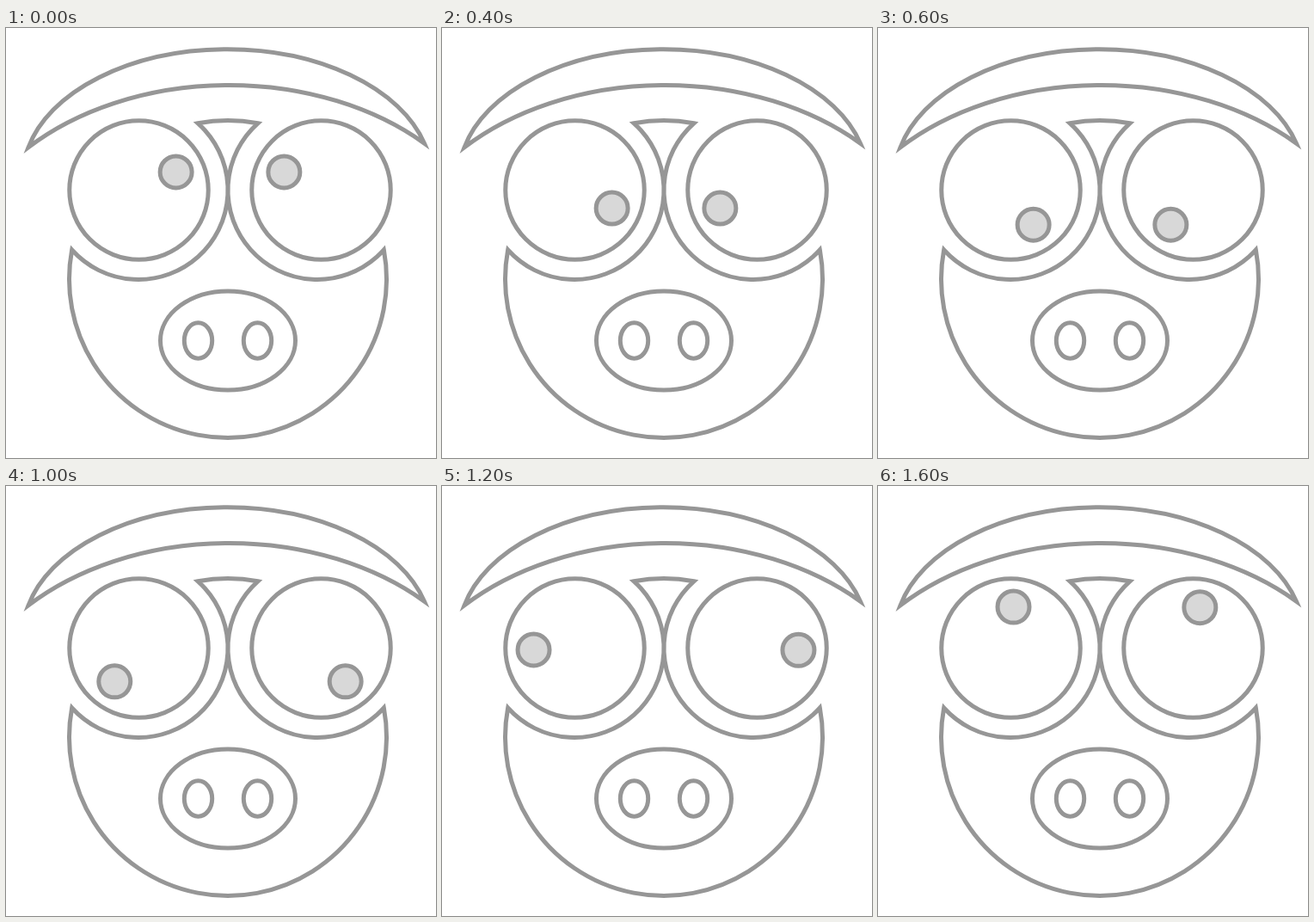
These frames come from a looping animation (500 px wide and 500 px high, 1800 ms). An HTML page with a canvas:

```html
<!DOCTYPE html>
<html lang="en">
<head>
<meta charset="utf-8">
<title>Rolling eyes</title>
<style>
  html, body { margin: 0; width: 100%; height: 100%; overflow: hidden; background: #fff; }
  canvas { display: block; }
</style>
</head>
<body>
<canvas id="stage" width="500" height="500"></canvas>
<script>
const ctx = document.getElementById('stage').getContext('2d');
const TAU = Math.PI * 2;
const LINE = '#969696';
const PUPIL = '#d8d8d8';
const STEP_MS = 200;

const face = { x: 258, y: 292, r: 184.5 };
const goggle = { x: 154, y: 188.5, r: 104 };
const eyes = [{ x: 154.5, side: 1 }, { x: 366.5, side: -1 }];
const eyeY = 188.5;
const orbit = 48;
const innerLimit = 44;

// Direction of gaze in degrees at each step; the eyes mirror each other
const gaze = [-26, -2, 26, 57, 85, 126, 177.6, 234.5, 273.6];

const hat = new Path2D(
  'M26 138.8 A237.5 148 0 0 1 486.5 134.2 A320 229 0 0 0 26 138.8 Z');

function ellipse(x, y, rx, ry = rx, fill = '#fff') {
  ctx.beginPath();
  ctx.ellipse(x, y, rx, ry, 0, 0, TAU);
  ctx.fillStyle = fill;
  ctx.fill();
  ctx.stroke();
}

// Face disc with a goggle circle cut out on either side
function drawFace() {
  const dx = face.x - goggle.x, dy = face.y - goggle.y;
  const d = Math.hypot(dx, dy);
  const axis = Math.atan2(dy, dx);
  const spread = Math.acos((goggle.r ** 2 - face.r ** 2 + d * d) / (2 * d * goggle.r));
  const low = axis + spread, high = axis - spread;
  const faceAngle = a => Math.atan2(
    goggle.y + goggle.r * Math.sin(a) - face.y,
    goggle.x + goggle.r * Math.cos(a) - face.x);
  const top = faceAngle(high), side = faceAngle(low);

  ctx.beginPath();
  ctx.arc(goggle.x, goggle.y, goggle.r, low, high, true);
  ctx.arc(face.x, face.y, face.r, top, -Math.PI - top);
  ctx.arc(2 * face.x - goggle.x, goggle.y, goggle.r, Math.PI - high, Math.PI - low, true);
  ctx.arc(face.x, face.y, face.r, Math.PI - side, side);
  ctx.closePath();
  ctx.stroke();
}

function drawEye({ x, side }, step) {
  // The right eye falls behind towards the end of the roll
  const lag = side < 0 ? 13 * (step / 8) ** 12 : 0;
  const angle = (gaze[step] - lag) * TAU / 360;
  const dx = Math.min(innerLimit, orbit * Math.cos(angle));
  ellipse(x, eyeY, 80.75);
  ellipse(x + side * dx, eyeY + orbit * Math.sin(angle), 18.5, 18.5, PUPIL);
}

function draw(time) {
  const step = Math.floor(time / STEP_MS) % gaze.length;
  ctx.fillStyle = '#fff';
  ctx.fillRect(0, 0, 500, 500);
  ctx.strokeStyle = LINE;
  ctx.lineWidth = 5;

  ctx.stroke(hat);
  drawFace();
  for (const eye of eyes) drawEye(eye, step);
  ellipse(258, 363.5, 78.5, 57.5);
  for (const x of [223.5, 292.5]) ellipse(x, 363.5, 16.2, 20.7);
}

const start = performance.now();
function tick() {
  draw(performance.now() - start);
  requestAnimationFrame(tick);
}
tick();
</script>
</body>
</html>
```
